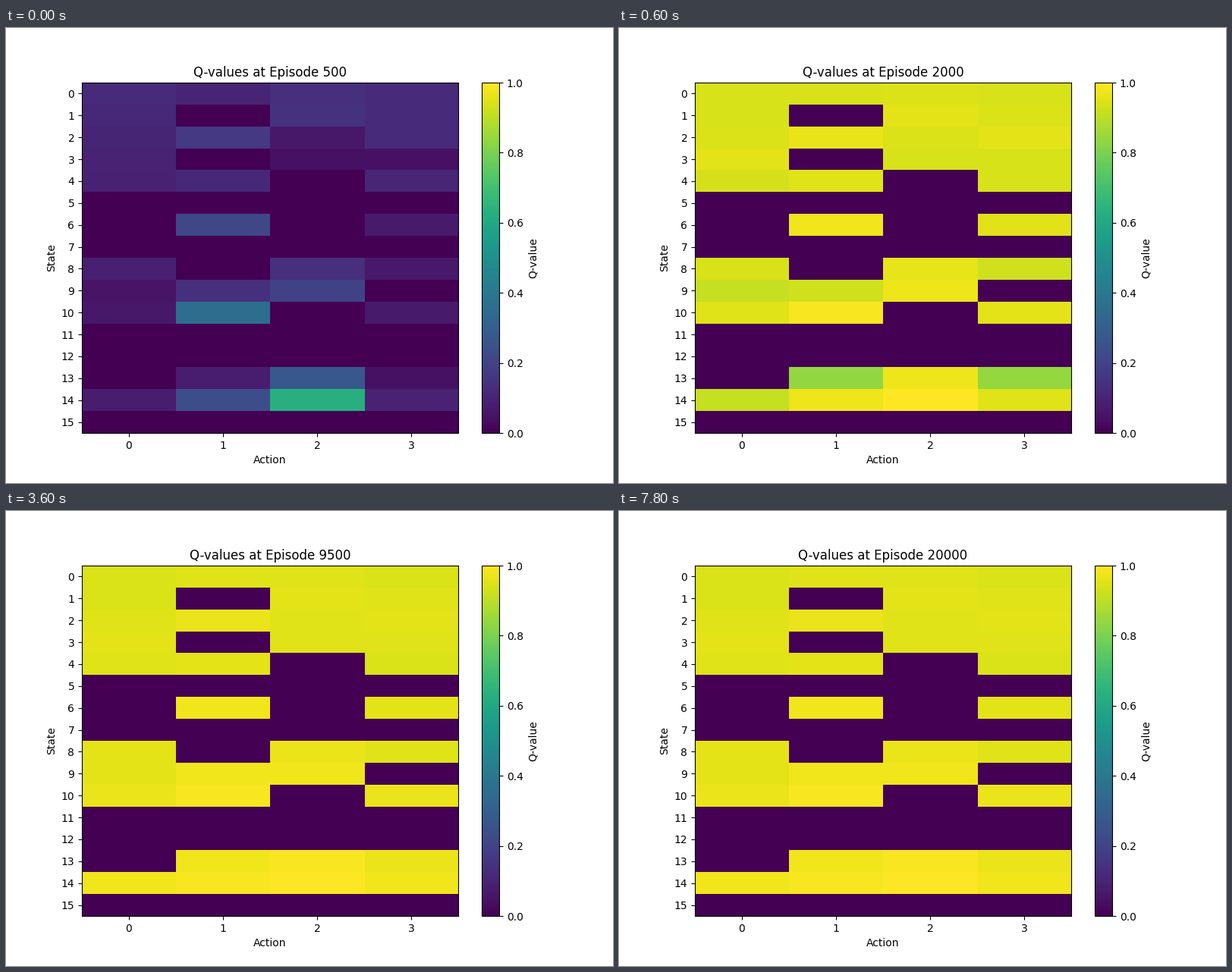
These frames come from a looping animation (800x600 px, 8 s). A matplotlib script:

```python
import numpy as np
import matplotlib.pyplot as plt
from matplotlib.animation import FuncAnimation

SIZE = 4
STATES, ACTIONS = SIZE * SIZE, 4
HOLES = [5, 7, 11, 12]
GOAL = 15
ALPHA, GAMMA = 0.1, 0.99
DECAY = 1e-4        # exploration decay per episode
STEP = 500          # episodes between two pictures
FRAMES = 40


def neighbours():
    """Next state for the moves left, down, right, up."""
    row, col = np.divmod(np.arange(STATES), SIZE)
    left, right = np.maximum(col - 1, 0), np.minimum(col + 1, SIZE - 1)
    up, down = np.maximum(row - 1, 0), np.minimum(row + 1, SIZE - 1)
    return np.stack([row * SIZE + left, down * SIZE + col,
                     row * SIZE + right, up * SIZE + col], axis=1)


def train():
    """Mean course of epsilon-greedy Q-learning on the grid."""
    nxt = neighbours()
    reward = (nxt == GOAL).astype(float)
    alive = np.ones((STATES, 1))
    alive[HOLES + [GOAL]] = 0
    moves = np.eye(STATES)[nxt] * alive[:, :, None]
    start = np.eye(STATES)[0]
    states = np.arange(STATES)

    q = np.zeros((STATES, ACTIONS))
    tables = []
    for episode in range(1, STEP * FRAMES + 1):
        epsilon = np.exp(-DECAY * episode)
        policy = np.full_like(q, epsilon / ACTIONS)
        policy[states, q.argmax(axis=1)] += 1 - epsilon
        # expected visits of every state in one episode
        flow = (policy[:, :, None] * moves).sum(axis=1)
        visits = np.linalg.solve(np.eye(STATES) - flow.T, start)
        rate = 1 - (1 - ALPHA) ** (visits[:, None] * policy * alive)
        q = q + rate * (reward + GAMMA * q.max(axis=1)[nxt] - q)
        if episode % STEP == 0:
            tables.append(q)
    return tables


tables = train()

fig, ax = plt.subplots(figsize=(8, 6), dpi=100)
image = ax.imshow(tables[0], cmap="viridis", aspect="auto", vmin=0, vmax=1)
fig.colorbar(image, ax=ax, label="Q-value")
ax.set_xlabel("Action")
ax.set_ylabel("State")
ax.set_xticks(range(ACTIONS))
ax.set_yticks(range(STATES))
title = ax.set_title("")


def draw(i):
    image.set_data(tables[i])
    title.set_text(f"Q-values at Episode {STEP * (i + 1)}")
    return image, title


anim = FuncAnimation(fig, draw, frames=FRAMES, interval=200,
                     init_func=lambda: draw(0), repeat=True)
plt.show()
```
